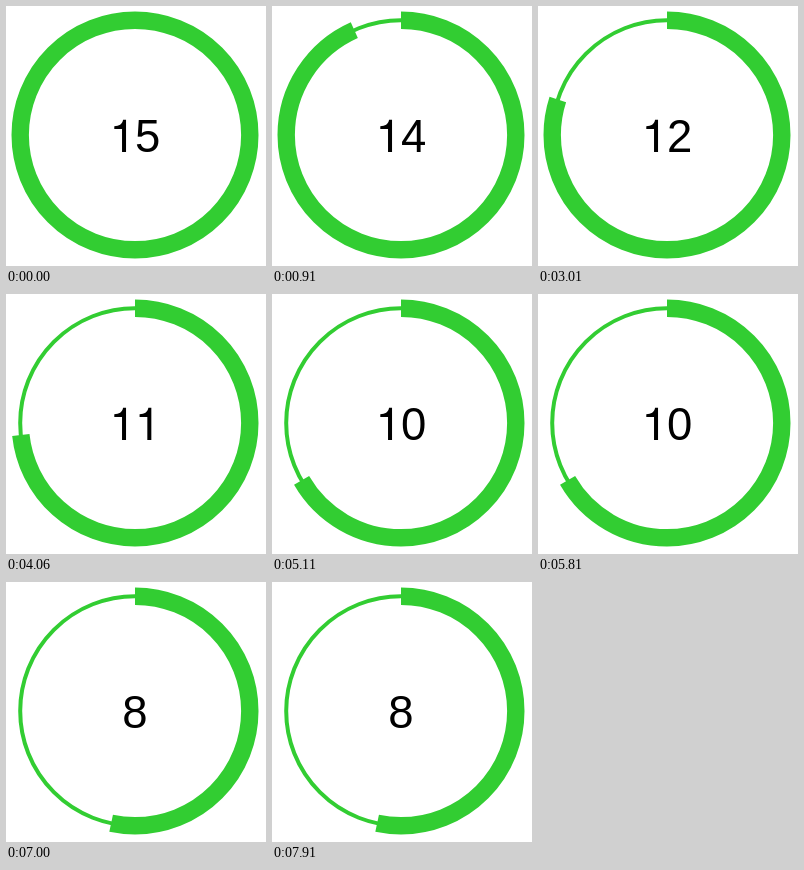
Animation of 260 by 260 pixels, one loop 8000 ms. Source, as an HTML page with a canvas:

```html
<!DOCTYPE html>
<html lang="en">
<head>
<meta charset="utf-8">
<title>Countdown ring</title>
<style>
  html, body { margin: 0; width: 100%; height: 100%; overflow: hidden; background: #fff; }
  canvas { display: block; width: 260px; height: 260px; }
</style>
</head>
<body>
<canvas id="stage"></canvas>
<script>
const SIZE = 260, LOOP = 8000;
const TOTAL = 15, FIRST_TICK = 700, TICK = 1050;
const CENTER = 129, RADIUS = 114.8, GREEN = '#32cd32';
const FONT = 45.5, BASELINE = 146, ADVANCE = 0.556 * FONT;

const canvas = document.getElementById('stage');
const ctx = canvas.getContext('2d');
const ratio = window.devicePixelRatio || 1;
canvas.width = canvas.height = SIZE * ratio;
ctx.scale(ratio, ratio);

function ring(width, share) {
  const top = -Math.PI / 2;
  ctx.beginPath();
  ctx.arc(CENTER, CENTER, RADIUS, top, top + share * 2 * Math.PI);
  ctx.lineWidth = width;
  ctx.strokeStyle = GREEN;
  ctx.stroke();
}

// A "1" without a foot, in em units above the baseline.
function plainOne(x) {
  ctx.save();
  ctx.translate(x, BASELINE);
  ctx.scale(FONT, -FONT);
  ctx.beginPath();
  ctx.moveTo(0.359, 0);
  ctx.lineTo(0.359, 0.709);
  ctx.lineTo(0.294, 0.709);
  ctx.bezierCurveTo(0.272, 0.602, 0.21, 0.572, 0.101, 0.568);
  ctx.lineTo(0.101, 0.505);
  ctx.lineTo(0.271, 0.505);
  ctx.lineTo(0.271, 0);
  ctx.fill();
  ctx.restore();
}

function number(value) {
  const digits = String(value);
  const left = CENTER - digits.length * ADVANCE / 2;
  ctx.fillStyle = '#000';
  ctx.font = `${FONT}px "Liberation Sans", Arial, sans-serif`;
  [...digits].forEach((digit, i) => {
    const x = left + i * ADVANCE;
    if (digit === '1') plainOne(x);
    else ctx.fillText(digit, x, BASELINE);
  });
}

function draw(time) {
  const ticks = Math.max(0, Math.floor((time - FIRST_TICK) / TICK) + 1);
  const left = TOTAL - ticks;
  ctx.fillStyle = '#fff';
  ctx.fillRect(0, 0, SIZE, SIZE);
  ring(4, 1);
  ring(17.4, left / TOTAL);
  number(left);
}

const start = performance.now();
function frame() {
  draw((performance.now() - start) % LOOP);
  requestAnimationFrame(frame);
}
frame();
</script>
</body>
</html>
```
